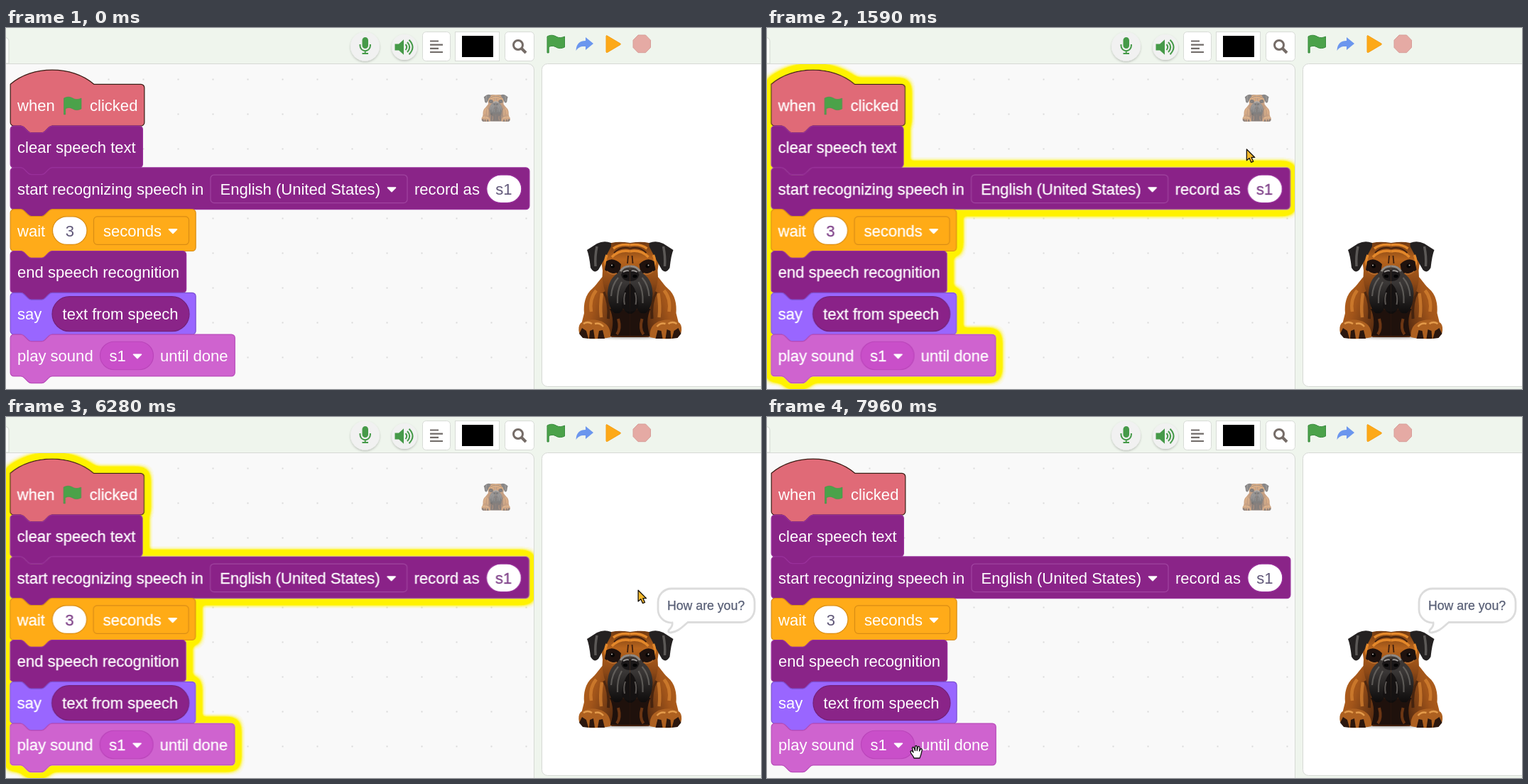
An HTML page that plays this animation: 1063x509 px, repeating every 8000 ms.

```html
<!DOCTYPE html>
<html lang="en">
<head>
<meta charset="utf-8">
<title>Speech blocks</title>
<style>
html, body { margin: 0; width: 100%; height: 100%; overflow: hidden; background: #eff5ed; }
svg { display: block; }
text { font-family: "Liberation Sans", Arial, sans-serif; white-space: pre; }
#labels text { font-size: 22.05px; fill: #fff; }
#labels text.value { fill: #62597a; text-anchor: middle; }
#stack.glow { filter: url(#glow); transform: translateX(-.4px); }
#stack.glow text { stroke: #fff; stroke-width: .3px; }
#stack.glow text.value { fill: #80438a; stroke: #80438a; }
</style>
</head>
<body>
<svg width="1063" height="509" viewBox="0 0 1063 509">
  <defs>
    <filter id="glow" filterUnits="userSpaceOnUse" x="-30" y="30" width="800" height="500">
      <feGaussianBlur in="SourceGraphic" stdDeviation="5.9"/>
      <feComponentTransfer result="spread"><feFuncA type="table" tableValues="0 1 1 1 1 1 1 1 1 1 1 1 1 1 1 1 1"/></feComponentTransfer>
      <feFlood flood-color="#fff200"/>
      <feComposite in2="spread" operator="in" result="halo"/>
      <feGaussianBlur in="SourceGraphic" stdDeviation=".4" color-interpolation-filters="sRGB" result="softened"/>
      <feComposite in="softened" in2="halo"/>
    </filter>
    <filter id="soft" x="-30%" y="-30%" width="160%" height="160%"><feGaussianBlur stdDeviation="1.6"/></filter>
    <filter id="lift" x="-30%" y="-30%" width="160%" height="170%"><feDropShadow dx="0" dy="1.5" stdDeviation="1.5" flood-opacity=".22"/></filter>
    <clipPath id="area"><path d="M0 51H735a8 8 0 0 1 8 8V509H0Z"/></clipPath>
    <pattern id="dots" x="-27" y="48" width="49" height="49" patternUnits="userSpaceOnUse">
      <rect x="23.5" y="23.5" width="2" height="2" fill="#dadada"/>
    </pattern>
    <linearGradient id="fur" x1="0" y1="0" x2="1" y2=".4">
      <stop offset="0" stop-color="#b9651c"/><stop offset=".4" stop-color="#a2551a"/><stop offset="1" stop-color="#42200e"/>
    </linearGradient>
    <linearGradient id="brow" x1="0" y1="0" x2="0" y2="1">
      <stop offset="0" stop-color="#6f3812"/><stop offset=".25" stop-color="#b8651d"/><stop offset=".6" stop-color="#8a4716"/><stop offset="1" stop-color="#2b160d"/>
    </linearGradient>
    <linearGradient id="mask" x1="0" y1="0" x2="0" y2="1">
      <stop offset="0" stop-color="#3c3633"/><stop offset=".35" stop-color="#3a3736"/><stop offset="1" stop-color="#0d0b0b"/>
    </linearGradient>
    <path id="flag" d="M0 2.5C4 .2 8.500 .2 12.500 2.500S20 4.500 24.500 2.500V17.500C20 19.500 16.500 19.800 12.500 17.500S5.500 15.600 2.200 17.300V25.500H0Z"/>

    <g id="dogSide">
      <path d="M846 346C836 352 834 360 826 367C815 376 813 390 814 402L810 418L853 436H879V352Z" fill="url(#fur)"/>
      <path d="M831 370Q821 382 824 400M839 374Q836 393 838 408" fill="none" stroke="#d98432" stroke-width="4.500" opacity=".7"/>
      <path d="M842 372Q850 386 848 410" fill="none" stroke="#32190d" stroke-width="4" opacity=".7"/>
      <path d="M850 396Q858 412 851 434H879V394Z" fill="#1f110c"/>
      <path d="M862 410Q866 424 860 432" fill="none" stroke="#6b3614" stroke-width="4"/>
      <path d="M809 416Q824 407 841 415Q852 421 851 436Q838 439 820 438L807 430Q805 421 809 416Z" fill="#ad6020"/>
      <path d="M807 431l4-8 6 4 3 11-8-1ZM821 438l1-11 5-2 2 13ZM833 438l2-11 5-1 3 12Z" fill="#2b170e"/>
      <path d="M813 417q6-4 12 0M829 417q7-2 12 4" fill="none" stroke="#e39a4a" stroke-width="2.500"/>
      <path d="M879 303Q855 299 843 307Q836 322 840 342Q838 358 845 376Q854 395 879 400Z" fill="url(#brow)"/>
      <path d="M852 303Q842 299 832 304L818 313Q821 320 823 338Q828 347 834 341Q841 329 852 308Z" fill="#242121"/>
      <path d="M832 308Q829 322 830 336" stroke="#5b5856" stroke-width="3.500" fill="none"/>
      <path d="M879 306Q864 304 855 311M879 315Q864 312 853 323M846 320Q842 329 846 337" fill="none" stroke="#e4882a" stroke-width="3.500"/>
      <path d="M879 311Q866 307 856 317M876 321L875 332" fill="none" stroke="#3f1f0e" stroke-width="1.800"/>
      <path d="M845 329Q855 322 866 333L864 345Q853 349 843 341Z" fill="#1f120e"/>
      <path d="M846 343Q853 349 860 346" fill="none" stroke="#b3692b" stroke-width="2"/>
      <circle cx="854" cy="335.500" r="3" fill="#050404"/>
      <circle cx="853" cy="334.500" r="1" fill="#c8beb6"/>
      <path d="M879 335Q866 336 861 346Q848 354 847 374Q848 396 857 402Q866 404 869 395Q873 403 879 403Z" fill="url(#mask)"/>
      <path d="M862 352Q853 362 852 378M867 358Q860 370 861 388" fill="none" stroke="#77736f" stroke-width="2.200" opacity=".65"/>
      <path d="M879 336Q870 335 865 343" fill="none" stroke="#8e8883" stroke-width="3"/>
      <path d="M879 341Q868 340 866 348Q868 357 879 357Z" fill="#1b1819"/>
      <ellipse cx="872" cy="350" rx="3.200" ry="2.200" fill="#030303"/>
      <path d="M869 344q4-2.500 8-1.500" stroke="#a5a19e" stroke-width="1.800" fill="none"/>
      <path d="M879 360Q869 366 867 392Q871 400 879 400Z" fill="#151212"/>
      <path d="M872 373Q869 381 871 390" stroke="#5b5754" stroke-width="2" fill="none"/>
    </g>
    <g id="dog">
      <ellipse cx="879" cy="434" rx="58" ry="4" fill="#777" opacity=".5" filter="url(#soft)"/>
      <use href="#dogSide"/><use href="#dogSide" transform="matrix(-1 0 0 1 1757.500 0)"/>
    </g>
  </defs>

  <!-- toolbar -->
  <path d="M-6 13.500H-1a5 5 0 0 1 5 5V50H-6Z" fill="#fbfdfa" stroke="#d3d8d1"/>
  <g filter="url(#lift)" fill="#f1f1f1"><circle cx="505.500" cy="26" r="20.500"/><circle cx="561" cy="27" r="18"/></g>
  <g fill="none" stroke="#469a49" stroke-width="2">
    <rect x="502.500" y="14" width="6.500" height="14" rx="3.250" fill="#469a49"/>
    <path d="M498.500 23v2a7.200 7.200 0 0 0 14.400 0v-2M505.700 32v4M501.500 36h8.500"/>
    <path d="M548.500 23.500h5l5.500-5v17l-5.500-5h-5Z" fill="#469a49"/>
    <path d="M562.500 23q3.500 4 0 8M565 19.800q6.500 7.200 0 14.400M567.500 16.800q10 10.200 0 20.400"/>
  </g>
  <g fill="#fff" stroke="#d8dbd7">
    <rect x="586.500" y="5.500" width="39" height="41" rx="5"/>
    <rect x="632.500" y="5.500" width="62" height="41"/>
    <rect x="702.500" y="5.500" width="41" height="41" rx="5"/>
  </g>
  <path d="M597 18.500h12M597 23.700h18M597 28.900h12M597 34h18" stroke="#706b68" stroke-width="2.200"/>
  <rect x="642" y="11" width="44" height="30" fill="#000"/>
  <g fill="none" stroke="#756c67" stroke-width="3"><circle cx="721" cy="24" r="6.500"/><path d="M726 29l6 6" stroke-width="4"/></g>

  <rect id="hover" x="754" y="2" width="40" height="40" rx="5" fill="#d6e7f1"/>
  <use href="#flag" x="762" y="9.500" fill="#4ba24a" stroke="#388b3d"/>
  <path d="M802.500 32C803 22 808 18 816 18V13L827 22L816 31V26C809 25.500 806 27 802.500 32Z" fill="#6b96ee"/>
  <path d="M845 11.500Q845 10 846.500 11L865 22Q866 22.700 865 23.500L846.500 34.500Q845 35 845 33.500Z" fill="#fda918" stroke="#f5a017"/>
  <path d="M890 10h10.500l7 7.200v10.300l-7 7.200H890l-7-7.200V17.200Z" fill="#e5aaa4" stroke="#d79d98"/>

  <!-- workspace -->
  <path d="M-2 50.500H735a8.500 8.500 0 0 1 8.500 8.500V512H-2Z" fill="#f9f9f9" stroke="#d6d9d5"/>
  <g clip-path="url(#area)">
    <rect y="51" width="743" height="458" fill="url(#dots)"/>
    <use href="#dog" transform="translate(444.500 9.800) scale(.279)" opacity=".52"/>
    <g id="stack">
      <g id="shapes" transform="translate(6.200 79.300) scale(1.225)"></g>
      <g id="labels"></g>
    </g>
  </g>

  <!-- stage -->
  <rect x="754.500" y="50.500" width="330" height="455" rx="8" fill="#fff" stroke="#d6d9d5"/>
  <use href="#dog"/>
  <g id="bubble">
    <path d="M938 290Q939 295 933.500 300Q931 304 936 304C946 303 952 296 960 289.500H1035A19 19 0 0 0 1054 270V261A19 19 0 0 0 1035 242H937A19 19 0 0 0 918 261V270A19 19 0 0 0 938 290Z" fill="#fff" stroke="#dcdcdc" stroke-width="2.800"/>
    <text x="931" y="271.500" font-size="17.700" fill="#575e75" stroke="#575e75" stroke-width=".25">How are you?</text>
  </g>

  <g id="arrow"><path d="M.6 .8V16.500L4.300 13.300L7 19.200L10 17.900L7.400 12.200H12Z" fill="#f4b92c" stroke="#17120a" stroke-width="1.300" stroke-linejoin="round"/></g>
  <g id="hand"><path d="M-3 9C-4 5-8 3-8-.5C-7-2-5.500-1.500-4 1L-5.500-5C-5.500-7-3.300-7-2.800-5L-1.500-1.500V-7C-1.300-9 1-9 1.200-7V-1.500L2.500-6.500C3-8.300 5.200-7.700 5-5.500L4.500-1L6-3.500C7-5 8.700-4 8.200-2C7.500 2 7 5 5 9Z" fill="#fff" stroke="#111" stroke-width="1.300" stroke-linejoin="round"/></g>
</svg>
<script>
const $ = id => document.getElementById(id);
const LOOP = 8000, ROW = 58.8;

const NOTCH = 'c2 0 3 1 4 2l4 4c1 1 2 2 4 2h12c2 0 3-1 4-2l4-4c1-1 2-2 4-2';
const TAB = 'c-2 0-3 1-4 2l-4 4c-1 1-2 2-4 2h-12c-2 0-3-1-4-2l-4-4c-1-1-2-2-4-2';
const outline = (w, hat) =>
  (hat ? 'M0 0c25-22 71-22 96 0' : 'M0 4a4 4 0 0 1 4-4H12' + NOTCH) +
  `H${w - 4}a4 4 0 0 1 4 4V44a4 4 0 0 1-4 4H48${TAB}H4a4 4 0 0 1-4-4Z`;

// width, fill, stroke
const speech = ['#8a2488', '#98309a'];
const blocks = [
  [154, '#e06a77', '#3b1c14'], [152, ...speech], [596.5, ...speech],
  [213, '#ffab19', '#d98d14'], [202, ...speech],
  [213, '#9966ff', '#7b50d2'], [258, '#cf63cf', '#b94cba']
];
$('shapes').innerHTML = blocks.map(([w, fill, stroke], i) =>
  `<path d="${outline(w, !i)}" transform="translate(0 ${i * 48})" fill="${fill}" stroke="${stroke}"/>`).join('');

const label = (row, x, text, cls = '') =>
  `<text class="${cls}" x="${x}" y="${117.2 + row * ROW}">${text}</text>`;
const field = (row, x, w, fill, stroke, rx = 20, h = 39.5) =>
  `<rect x="${x}" y="${109.2 + row * ROW - h / 2}" width="${w}" height="${h}" rx="${rx}" fill="${fill}" stroke="${stroke}" stroke-width="1.2"/>`;
const caret = (row, x) =>
  `<path d="M${x - 5.5} ${107.5 + row * ROW}h11l-5.500 5.500z" fill="#fff" stroke="#fff" stroke-width="1.600" stroke-linejoin="round"/>`;

$('labels').innerHTML = [
  label(0, 16, 'when'), '<use href="#flag" x="81.500" y="96.500" fill="#4ba24a" stroke="#41964a" stroke-width=".6"/>', label(0, 118, 'clicked'),
  label(1, 16, 'clear speech text'),
  label(2, 16, 'start recognizing speech in'), field(2, 288, 277, '#8a2488', '#a044a0', 5),
  label(2, 301.5, 'English (United States)'), caret(2, 543), label(2, 575, 'record as'),
  field(2, 676.8, 49, '#fff', '#98309a'), label(2, 701, 's1', 'value'),
  label(3, 16, 'wait'), field(3, 65.5, 48.5, '#fff', '#d98d14'), label(3, 90, '3', 'value'),
  field(3, 123.5, 134, '#ffab19', '#d98d14', 5), label(3, 137, 'seconds'), caret(3, 235),
  label(4, 16, 'end speech recognition'),
  label(5, 16, 'say'), field(5, 65, 193, '#8a2488', '#752078', 24.5, 49), label(5, 79.5, 'text from speech'),
  label(6, 16, 'play sound'), field(6, 132.5, 75, '#c94fc9', '#bb45bb'), label(6, 145.5, 's1'),
  caret(6, 185), label(6, 217, 'until done')
].join('');

// Pointer path: time, x, y
const track = [
  [200, 1050, 440], [340, 1010, 360], [550, 900, 180], [760, 800, 70], [900, 760, 36], [970, 755, 29],
  [1170, 755, 29], [1240, 752, 38], [1380, 735, 70], [1520, 709.5, 110.5], [1660, 640, 230], [1800, 540, 380], [1940, 494.5, 426.5],
  [5520, 494.5, 426.5], [5590, 510, 425], [5730, 720, 390], [5870, 925, 335], [5940, 947, 323],
  [6140, 940, 305], [6210, 915, 265], [6280, 889.5, 243.5], [6350, 893, 250], [6630, 1003, 272], [6770, 960, 290],
  [6840, 850, 335], [6910, 713, 385], [6980, 532.5, 414.5], [7050, 400, 438], [7120, 310, 455],
  [7260, 215, 466], [7400, 172, 475], [7550, 180, 474], [7750, 205, 472], [7960, 210, 472]
];
// The pointer moves in 70 ms ticks inside each span and rests between them.
const spans = [[200, 970], [1240, 1940], [5590, 5940], [6140, 7960]];

function pointerAt(t) {
  const [from, to] = spans.findLast(s => t >= s[0]);
  const tick = Math.min(to, from + Math.floor((t - from) / 70) * 70);
  const i = track.findLastIndex(p => p[0] <= tick);
  const a = track[i], b = track[i + 1] || a;
  const k = b === a ? 0 : (tick - a[0]) / (b[0] - a[0]);
  return [a[1] + (b[1] - a[1]) * k, a[2] + (b[2] - a[2]) * k];
}

const show = (id, on) => { $(id).style.display = on ? '' : 'none'; };
const start = performance.now();

function draw() {
  const t = (performance.now() - start) % LOOP;
  show('hover', t >= 1040 && t < 1590);
  show('bubble', t >= 5260);
  $('stack').classList.toggle('glow', t >= 1590 && t < 7890);
  const visible = t >= 200;
  const [x, y] = visible ? pointerAt(t) : [0, 0];
  const grabbing = t > 7000 && x < 323;
  show('arrow', visible && !grabbing);
  show('hand', visible && grabbing);
  $(grabbing ? 'hand' : 'arrow').setAttribute('transform', `translate(${x} ${y})`);
  requestAnimationFrame(draw);
}
draw();
</script>
</body>
</html>
```
